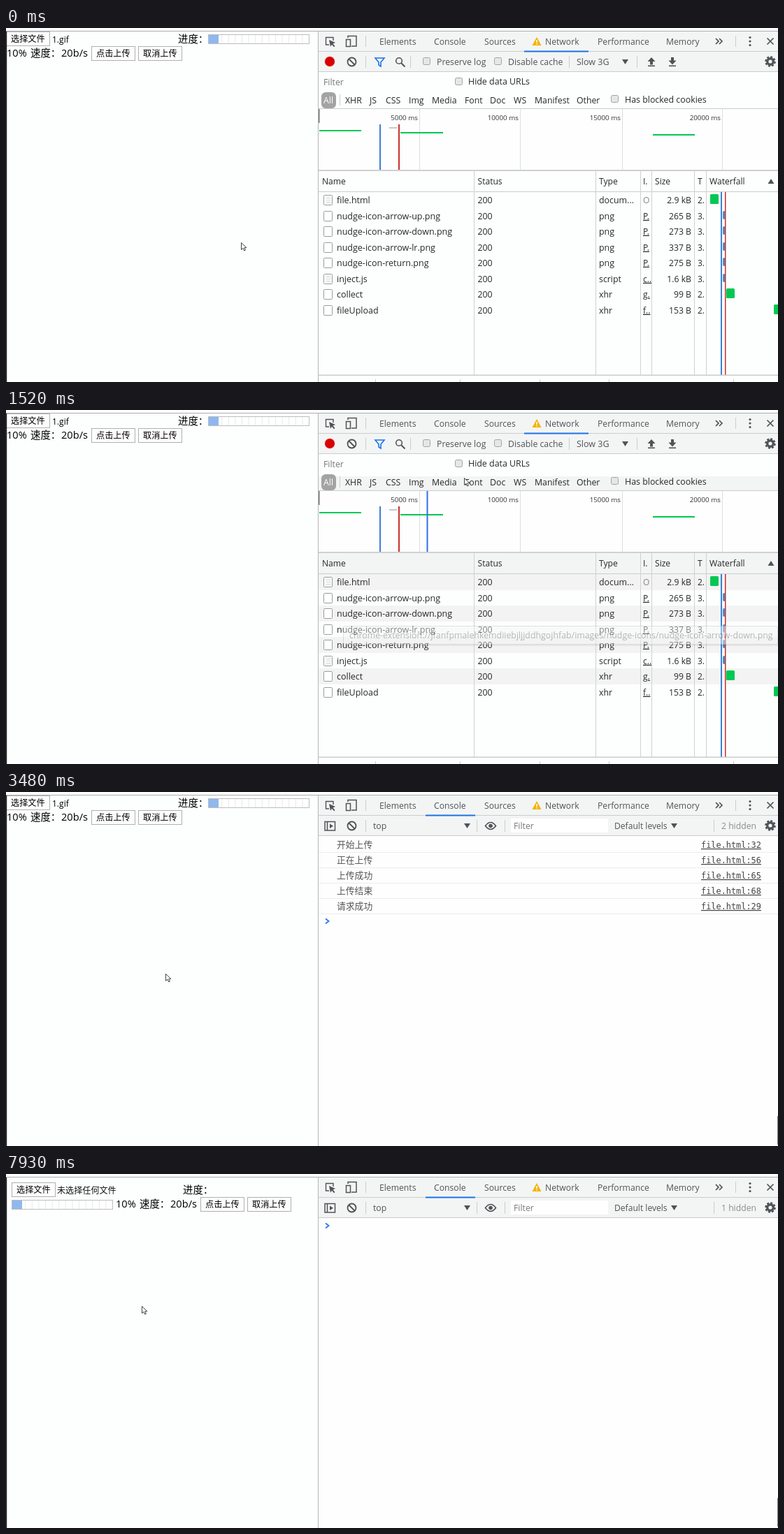
Write an HTML page that moves like this. It is 1104 px wide and 507 px high and loops after 8 s.

```html
<!DOCTYPE html>
<html lang="zh-CN">
<head>
<meta charset="utf-8">
<title>Upload progress</title>
<style>
html, body { margin: 0; width: 100%; height: 100%; overflow: hidden; background: #fdfefe; }
svg { display: block; width: 100vw; height: 100vh; }
text { font-family: "Open Sans", "Noto Sans CJK SC", "Noto Sans CJK", sans-serif; white-space: pre; }
.mono { font-family: "DejaVu Sans Mono", monospace; text-decoration: underline; }
</style>
</head>
<body>
<svg id="stage" viewBox="0 0 1104 507" preserveAspectRatio="none"></svg>
<script>
const INK = '#505357', DARK = '#262728', BAR = '#f3f4f4', EDGE = '#cbcdcd', BLUE = '#1a73e8', GREEN = '#00c853';

const text = (x, y, s, size = 12.3, fill = INK, more = '') =>
  `<text x="${x}" y="${y}" font-size="${size}" fill="${fill}" ${more}>${s}</text>`;
const rect = (x, y, w, h, fill, more = '') =>
  `<rect x="${x}" y="${y}" width="${w}" height="${h}" fill="${fill}" ${more}/>`;
const path = (d, stroke, width = 1.3, fill = 'none') =>
  `<path d="${d}" stroke="${stroke}" stroke-width="${width}" fill="${fill}"/>`;
const circle = (x, y, r, fill, more = '') => `<circle cx="${x}" cy="${y}" r="${r}" fill="${fill}" ${more}/>`;
const ring = (x, y, r, width, more = '') => circle(x, y, r, 'none', `stroke="${INK}" stroke-width="${width}" ${more}`);
const vline = (x, y1, y2, color = EDGE, width = 1) => rect(x, y1, width, y2 - y1, color);
const hline = (y, color = EDGE, x = 447) => rect(x, y, 1104 - x, 1, color);
const group = (id, body) => `<g id="${id}">${body}</g>`;
const solid = (d, fill) => path(d, 'none', 0, fill);
const check = (x, y) => rect(x + .5, y + .5, 10, 10, '#e6e6e6', 'rx="2" stroke="#a3a3a3"');
const drop = (x, y) => solid(`M${x} ${y}h9l-4.5 7z`, INK);
const underline = (x, w) => rect(x, 32.5, w, 2, BLUE);

// web page on the left
const button = (x, y, label) =>
  rect(x + .5, y + .5, 62, 20, '#fdfdfd', 'stroke="#b0b0b0"') + text(x + 7, y + 15, label, 12.2, '#000');

function bar(x, y) {
  let s = rect(x + .5, y + .5, 144, 13, '#fff', 'stroke="#bdbdbd"');
  for (let i = 2; i < 15; i++) s += vline(x + i * 9.6, y + 1, y + 13, '#e6e9ea');
  return s + rect(x + 1, y + 1, 14, 12, '#8fb8ee');
}

const stats = (x, y) =>
  text(x + 1, y + 15, '10%', 14.6, '#000') +
  text(x + 35, y + 15, '速度：', 14.4, '#000') +
  text(x + 79, y + 15, '20b/s', 14.6, '#000') +
  button(x + 122, y, '点击上传') + button(x + 189, y, '取消上传');

const oldPage = button(0, 5, '选择文件') + text(66, 20.5, '1.gif', 12, '#000') +
  text(246, 20.7, '进度：', 14.4, '#000') + bar(289, 9) + stats(0, 26);
const picker = button(8, 12, '选择文件') + text(73, 27.5, '未选择任何文件', 12.1, '#111');
const newRest = text(253, 28, '进度：', 14.4, '#000') + bar(8, 37) + stats(156, 33);

// shared developer tools parts
const gear = ring(1093, 48, 4.3, 3.4) + ring(1093, 48, 6.6, 2.4, 'stroke-dasharray="3 2.18"');
const noEntry = ring(494.5, 48.5, 6, 1.8) + path('M490 44l9 9', INK, 1.8);

const tabNames = [[534, 'Elements'], [612, 'Console'], [684, 'Sources'], [771, 'Network'],
  [846, 'Performance'], [944, 'Memory']];
const tabs =
  path('M468 18V13.5H457.500V24H462', INK, 1.4) + solid('M462 17l9 4-3.500 1.500 3 3.500-1.500 1.300-3-3.600-2 3z', INK) +
  path('M489 14V11.500H501V26H494', INK, 1.5) + path('M486.500 16.500h6v10h-6z', INK, 1.5) +
  vline(514, 11, 27) + vline(1043, 11, 27) +
  tabNames.map(([x, s]) => text(x, 23.5, s, 12.2)).join('') +
  solid('M759 13L765.500 25H752.500Z', '#f4b400') + rect(758.3, 17, 1.5, 4, '#fff') + rect(758.3, 22, 1.5, 1.5, '#fff') +
  path('M1015 15l4 4-4 4M1020 15l4 4-4 4', INK, 1.7) +
  [13.5, 19, 24.5].map(y => circle(1064, y, 1.6, INK)).join('') +
  path('M1088.500 14.500l9 9M1097.500 14.500l-9 9', INK, 1.7);

// network panel
function toolbar() {
  let s = circle(463, 48, 8, '#f3dcdc') + circle(463, 48, 7, '#d80000') + noEntry;
  s += path('M528 43H541L536 49V55L533 53V49Z', BLUE, 1.6);
  s += ring(562, 47, 4.3, 1.6) + path('M565 50l5.500 5.500', INK, 1.9);
  s += [514, 578, 805, 902].map(x => vline(x, 40, 57)).join('');
  s += check(596, 42) + text(616, 53, 'Preserve log') + check(698, 42) + text(718, 53, 'Disable cache');
  s += text(816, 53, 'Slow 3G', 12.5) + drop(881, 45);
  s += solid('M923 42l5.500 6h-3.500v4.500h-4V48h-3.500z', INK) + rect(918, 53.5, 10, 1.6, INK);
  s += solid('M953 52.500l5.500-6h-3.500V42h-4v4.500h-3.500z', INK) + rect(948, 53.5, 10, 1.6, INK);
  return s + gear;
}

function filters() {
  const types = [[485, 'XHR'], [520, 'JS'], [543, 'CSS'], [576, 'Img'], [609, 'Media'], [656, 'Font'],
    [692, 'Doc'], [726, 'WS'], [756, 'Manifest'], [816, 'Other']];
  return text(454, 81.5, 'Filter', 12.3, '#777') + check(642, 71) + text(661, 81, 'Hide data URLs', 12.4, DARK) +
    rect(451, 92, 21, 23, '#a3a3a3', 'rx="6"') + text(454, 108, 'All', 12.3, '#fff') + vline(477, 95, 111) +
    types.map(([x, s]) => text(x, 108, s, 12.3, DARK)).join('') +
    check(865, 96) + text(885, 107, 'Has blocked cookies', 12.4, DARK);
}

function overview() {
  let s = rect(447, 116, 657, 88, '#fefefe') + hline(115);
  [591, 735, 881, 1024].forEach((x, i) => {
    s += vline(x, 116, 203, '#dcdede') +
      text(x - 2, 131.5, (i + 1) * 5000 + ' ms', 9.8, '#333', 'text-anchor="end"');
  });
  s += vline(447, 116, 136, '#777', 1.5);
  s += rect(448, 146, 60, 2, GREEN) + rect(548, 142, 11, 2, '#c8c8c8');
  s += rect(564, 149, 61, 2, GREEN) + rect(925, 152, 60, 2, GREEN);
  return s + vline(534, 138, 203, '#3f7fd0', 2) + vline(561, 138, 203, '#c9302c', 2) + rect(447, 203, 657, 2, '#cfd1d1');
}

const ROW = 22.57;
const rowY = i => Math.round(235 + i * ROW);
const files = [
  ['file.html', 'docum...', 'O', '2.9 kB', 2], ['nudge-icon-arrow-up.png', 'png', 'P.', '265 B', 3],
  ['nudge-icon-arrow-down.png', 'png', 'P.', '273 B', 3], ['nudge-icon-arrow-lr.png', 'png', 'P.', '337 B', 3],
  ['nudge-icon-return.png', 'png', 'P.', '275 B', 3], ['inject.js', 'script', 'c..', '1.6 kB', 3],
  ['collect', 'xhr', 'g.', '99 B', 2], ['fileUpload', 'xhr', 'f..', '153 B', 2]];

function table() {
  let s = hline(234);
  [[452, 'Name'], [674.5, 'Status'], [848, 'Type'], [911, 'I.'], [928, 'Size'], [989, 'T'], [1006, 'Waterfall']]
    .forEach(([x, label]) => s += text(x, 224, label, 12.1, DARK));
  s += solid('M1089.500 223h9l-4.500-7z', INK);
  files.forEach(([name, type, from, size, time], i) => {
    const y = rowY(i), base = y + 15.8;
    s += rect(454.5, y + 4.5, 12, 14, '#fff', 'rx="1" stroke="#9a9c9e"');
    if (i === 0 || i === 5) s += path(`M457.500 ${y + 8.5}h7m-7 3h7m-7 3h7`, '#d0d2d3', 1);
    s += text(473, base, name, 12.5, DARK) + text(674.5, base, '200', 12.3, DARK) + text(848, base, type, 12.4, DARK);
    s += text(911, base, from, 12, i ? DARK : '#888', i ? 'text-decoration="underline"' : '');
    s += text(980, base, size, 12.2, DARK, 'text-anchor="end"') + text(989, base, time + '.', 12, DARK);
    if (i > 0 && i < 6) s += rect(1025, y + 4, 4, 12, '#4a90cc', 'rx="2"');
  });
  [[1007, 0, 12], [1030, 6, 12], [1098, 7, 8]].forEach(([x, i, w]) => s += rect(x, rowY(i) + 3, w, 14, GREEN, 'rx="1.5"'));
  s += [669, 843, 907, 923, 984, 1001].map(x => vline(x, 205, 497, '#cfd1d2')).join('');
  s += vline(1022, 235, 497, '#3f7fd0', 2) + vline(1028, 235, 497, '#c9302c', 1.5);
  s += rect(447, 496.5, 657, 1.5, EDGE);
  return s + [528, 649, 763, 862, 1040].map(x => vline(x, 503, 507)).join('');
}

const stripe = i => rect(447, rowY(i), 657, rowY(i + 1) - rowY(i), '#f3f3f3');
const network =
  group('stripeA', rect(476, 337, 519, 11, '#f3f3f3') + stripe(6)) +
  group('stripeB', [0, 2, 4, 6].map(stripe).join('')) +
  group('hover', rect(447, rowY(7), 657, 23, '#f0f4fc')) +
  group('shadeA', rect(447, 95, 657, 20, BAR) + rect(447, 205, 657, 29, BAR)) +
  group('shadeB', rect(628, 67, 476, 28, BAR) + rect(464, 63, 438, 4, BAR)) +
  toolbar() + filters() + overview() + table() +
  group('guide', vline(601.5, 116, 203, '#2f6fe4', 2)) + underline(741, 92);

// console panel
const logs = [['开始上传', 32], ['正在上传', 56], ['上传成功', 65], ['上传结束', 68], ['请求成功', 29]];
const logRows = logs.map(([s, line], i) => {
  const y = 80 + i * 22;
  return text(473, y - .3, s, 12.8, '#555') +
    text(994, y, 'file.html:' + line, 11.9, '#444', 'class="mono"') + hline(Math.round(y + 5.6), '#ececec');
}).join('');
const eye = path('M685.500 48.500Q693 38.500 700.500 48.500Q693 58.500 685.500 48.500Z', INK, 1.7) + circle(693, 48.5, 2.8, INK);
const consolePanel = rect(447, 63, 657, 444, '#fefefe') +
  path('M456 42.500h14.500v12.500H456zM459.500 42.500v12.500', INK, 1.5) + solid('M463 45.500l5 3.300-5 3.300z', INK) + noEntry +
  [514, 673, 713, 1012].map(x => vline(x, 40, 57)).join('') +
  group('alert', rect(519, 35, 150, 27, '#fee3e3') + text(525, 53.3, '弹窗清理员', 13)) +
  group('top', text(525, 53, 'top', 12.3)) + drop(655, 45) + eye +
  rect(722, 38, 139, 20, '#fff') + text(726, 53, 'Filter', 12.3, '#777') +
  text(870, 53, 'Default levels', 12.1) + drop(951, 45) +
  text(1023, 53, '', 12.2, '#8a8c8e', 'id="hidden"') + gear +
  group('logs', logRows) + group('prompt', path('M457 -3.500l4.500 3.500-4.500 3.500', '#2f78ee', 1.8)) +
  group('thumb', vline(1103, 464, 505, '#777')) + underline(600, 71);

const tip = (id, x, y, w, s) => group(id,
  rect(x + 2, y + 2, w, 27, '#000', 'rx="2" opacity=".12"') +
  rect(x + .5, y + .5, w, 26, '#f4f4f4', 'rx="2" stroke="#bdbdbd"') + text(x + 9, y + 18.3, s, 12.35, '#626262'));
const address = 'chrome-extension://jfanfpmalehkemdiiebjljjddhgojhfab/images/nudge-icons/nudge-icon-arrow-down.png';

document.getElementById('stage').innerHTML =
  rect(0, 0, 1104, 507, '#fdfefe') +
  group('oldPage', oldPage) + group('picker', picker) + group('newRest', newRest) +
  rect(447, 5, 657, 58, BAR) + group('tabHover', rect(600, 5, 71, 28, '#e8e9e9')) + tabs + hline(33) + hline(62) +
  group('network', network) + group('console', consolePanel) +
  hline(4, '#a9b0ae', 0) + vline(0, 5, 507, '#1c1c1c', 1.2) + vline(446, 5, 507, '#b4b8b8') +
  tip('tipA', 535, 425, 201, 'http://localhost:3000/fileUpload') + tip('tipB', 482, 309, 621, address) +
  group('arrow', path('M.500 .500V10.500L3 8.300L4.700 12L6.400 11.200L4.800 7.700H8Z', '#444', 1, '#fff')) +
  group('hand', path('M3.500 8V1.500Q4.500 .200 5.500 1.500V5.500Q9.500 5.500 10.500 7V10.500L9 13.500H4.500L.800 8.500Q1.500 7 3.500 9Z', '#333', 1, '#fff'));

const parts = {};
document.querySelectorAll('[id]').forEach(e => parts[e.id] = e);
const show = (id, on) => parts[id].style.display = on ? '' : 'none';
const place = (id, x, y) => parts[id].setAttribute('transform', `translate(${x} ${y})`);

// time, x, y, pointer kind
const pointer = [
  [0, 336, 307, 'arrow'], [280, 476, 336, 'hand'], [430, 504, 385, 'hand'], [580, 513, 397, 'hand'],
  [700, 520, 406, 'hand'], [1280, 596, 290, 'hand'], [1400, 602, 150, 'arrow'], [1520, 655, 97, 'arrow'],
  [1640, 650, 100, 'arrow'], [1800, 630, 80, 'arrow'], [1950, 621, 27, 'hand'], [3050, 251, 258, 'arrow'],
  [3200, 228, 260, 'arrow'], [7540, 226, 272, 'arrow'], [7660, 225, 283, 'arrow'],
  [7810, 210, 235, 'arrow'], [7930, 194, 189, 'arrow']];

// parts that appear and vanish: from, to
const spans = {
  network: [0, 2500], console: [2500, 8000], oldPage: [0, 7260], picker: [7260, 8000], newRest: [7540, 8000],
  stripeA: [430, 1280], stripeB: [1280, 2500], hover: [580, 1280], shadeA: [1400, 2500], shadeB: [1800, 2500],
  tabHover: [1950, 3050], guide: [1400, 1640], tipA: [850, 1280], tipB: [1400, 1640],
  alert: [6830, 6980], logs: [2500, 6980], thumb: [3480, 8000]
};

function render(t) {
  for (const id in spans) show(id, t >= spans[id][0] && t < spans[id][1]);
  show('top', t < 6830 || t >= 6980);
  parts.tipB.setAttribute('opacity', t < 1520 ? 1 : .45);
  place('prompt', 0, t < 6980 ? 185 : 74);
  parts.hidden.textContent = t < 6980 ? '2 hidden' : t < 7540 ? '' : '1 hidden';
  const [, x, y, kind] = pointer.filter(p => p[0] <= t).pop();
  show('arrow', kind === 'arrow');
  show('hand', kind === 'hand');
  place(kind, x, y);
}

const start = performance.now();
function tick() {
  render((performance.now() - start) % 8000);
  requestAnimationFrame(tick);
}
tick();
</script>
</body>
</html>
```
